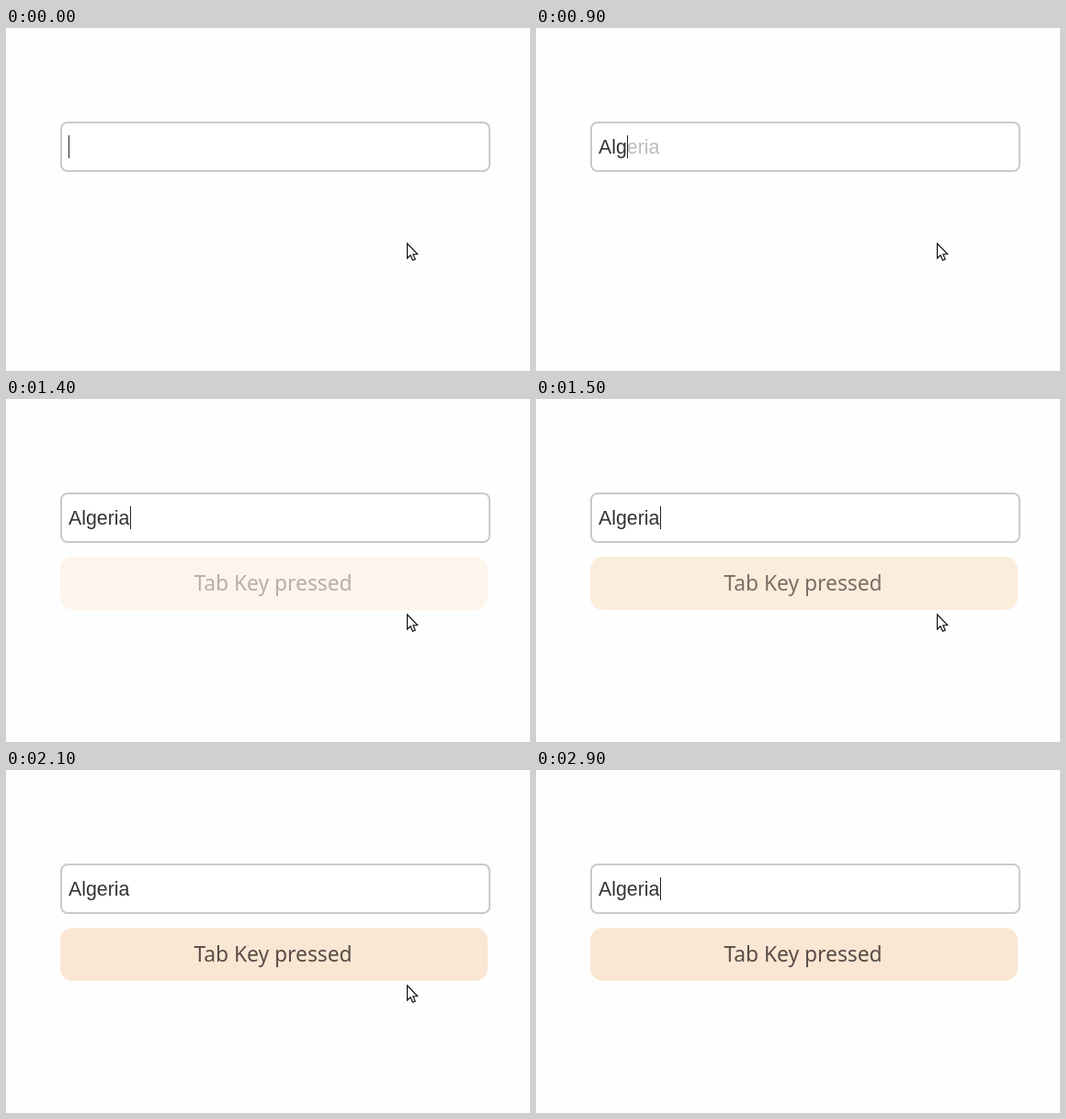
Recreate the animation shown at these times as an HTML page with a canvas. Size 570 by 374 pixels, loop 3000 ms.

```html
<!DOCTYPE html>
<html lang="en">
<head>
<meta charset="utf-8">
<title>Autocomplete with Tab</title>
<style>
  html, body { margin: 0; width: 100%; height: 100%; overflow: hidden; background: #fefefe; }
  canvas { display: block; }
</style>
</head>
<body>
<canvas id="stage" width="570" height="374"></canvas>
<script>
const ctx = document.getElementById('stage').getContext('2d');
const LOOP = 3000, STEP = 100;
const FIELD_FONT = '21.333px "Liberation Sans", Arial, sans-serif';
const NOTE_FONT = '22.8px "Noto Sans", "Open Sans", sans-serif';
const TEXT_X = 68, BASELINE = 137;

// start time, typed text, suggested rest
const typing = [
  [0, '', ''],
  [200, 'A', ''],
  [300, 'A', 'fganistan'],
  [500, 'Al', 'bania'],
  [900, 'Alg', 'eria'],
  [1300, 'Algeria', '']
];
const pointer = [[436.5, 235], [436.5, 251], [440, 247.7], [442.4, 253.3],
                 [445.2, 252.2], [442.9, 246.9], [447.6, 246.6]];

function roundBox(x, y, w, h, r) {
  ctx.beginPath();
  ctx.roundRect(x, y, w, h, r);
}

function drawField(t) {
  roundBox(60, 103, 466, 53, 7);
  ctx.fillStyle = '#fff';
  ctx.fill();
  ctx.strokeStyle = '#c9c9c9';
  ctx.lineWidth = 2;
  ctx.stroke();

  const [, typed, hint] = typing.filter(s => s[0] <= t).pop();
  ctx.font = FIELD_FONT;
  ctx.textAlign = 'left';
  const end = TEXT_X + ctx.measureText(typed).width;
  ctx.fillStyle = '#bbb';
  ctx.fillText(hint, end, BASELINE);
  ctx.fillStyle = '#333';
  ctx.fillText(typed, TEXT_X, BASELINE);

  const caretOn = t < 1900 || t >= 2500;
  if (caretOn) {
    ctx.fillStyle = '#222';
    ctx.fillRect(Math.ceil(end), 117, 1, 25);
  }
}

function drawNote(t) {
  const p = Math.min(Math.max((t - 1220) / 400, 0), 1);
  ctx.globalAlpha = 0.5 - Math.cos(p * Math.PI) / 2;
  roundBox(59, 172, 465, 58, 14);
  ctx.fillStyle = '#fae7d3';
  ctx.fill();
  ctx.font = NOTE_FONT;
  ctx.textAlign = 'center';
  ctx.fillStyle = '#574d47';
  ctx.fillText('Tab Key pressed', 290.5, 209);
  ctx.globalAlpha = 1;
}

function drawPointer() {
  ctx.beginPath();
  pointer.forEach(([x, y]) => ctx.lineTo(x, y));
  ctx.closePath();
  ctx.fillStyle = '#fff';
  ctx.fill();
  ctx.strokeStyle = '#111';
  ctx.lineWidth = 1.2;
  ctx.stroke();
}

function draw(now) {
  const t = Math.floor((now % LOOP) / STEP) * STEP;
  ctx.fillStyle = '#fefefe';
  ctx.fillRect(0, 0, 570, 374);
  drawField(t);
  if (t >= 1300) drawNote(t);
  if (t < 2700) drawPointer();
}

const start = performance.now();
function tick() {
  draw(performance.now() - start);
  requestAnimationFrame(tick);
}
tick();
</script>
</body>
</html>
```
